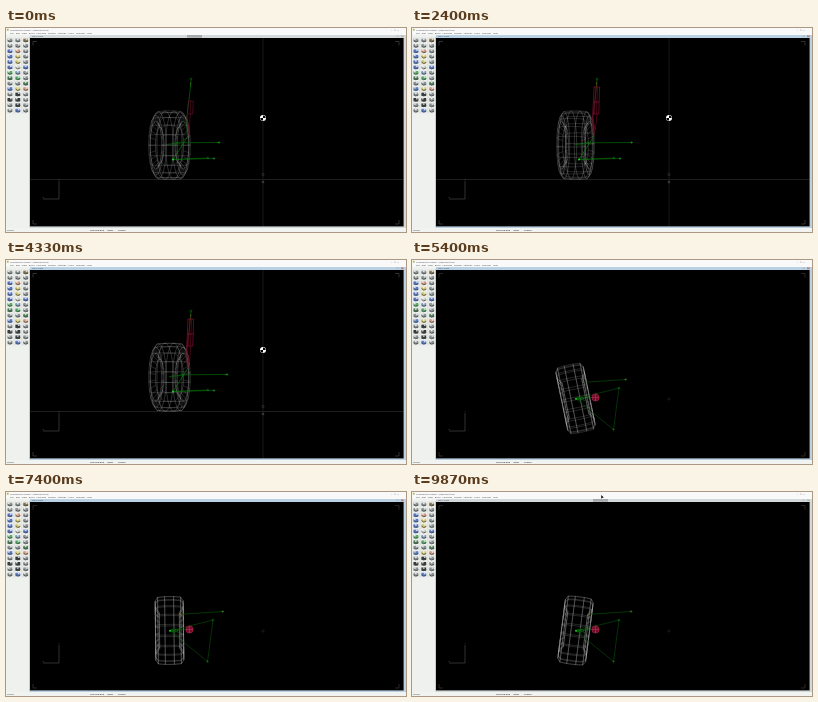
Recreate the animation shown at these times as an HTML page with a canvas. Size 400 px wide and 204 px high, loop 9.94 s.

```html
<!DOCTYPE html>
<html lang="en">
<head>
<meta charset="utf-8">
<title>Suspension steering</title>
<style>
  html, body { margin: 0; width: 100%; height: 100%; overflow: hidden; background: #000; }
  canvas { display: block; width: 400px; height: 204px; }
</style>
</head>
<body>
<canvas id="stage"></canvas>
<script>
const LOOP = 9940, PERIOD = 1740;
const PLAY_START = 70, TOP_VIEW = 4650, PLAY_END = 9500, CURSOR_IN = 7500;
const RAD = Math.PI / 180, SEGMENTS = 20;
const canvas = document.getElementById('stage');
const ctx = canvas.getContext('2d');
const dpr = window.devicePixelRatio || 1;
canvas.width = 400 * dpr;
canvas.height = 204 * dpr;

const GREEN = '#0a7a0d', DIM_GREEN = '#07520a', BRIGHT = '#14a51a', RED = '#a01038';

// Tyre cross-section: axial offset, radius
const half = [[4.5, 34.3], [11.5, 33.7], [14, 30], [14, 24], [10, 18]];
const profile = [...half.map(([a, r]) => [-a, r]).reverse(), ...half];

// One letter per toolbar icon, three per row
const iconRows = ['ggn', 'ggg', 'bog', 'byg', 'byg', 'bwb', 'ecg', 'deg', 'ggd', 'byo', 'gkg', 'kkg', 'gkg', 'gbg'];
const iconColors = {
  g: '#8f9594', n: '#8a7750', b: '#5a78c8', o: '#d99a7c', y: '#d3c46a',
  w: '#cfd0c4', e: '#58ad64', c: '#8098b8', d: '#4d7c55', k: '#343a3a'
};

function rect(x, y, w, h, color) {
  ctx.fillStyle = color;
  ctx.fillRect(x, y, w, h);
}

function line(points, color, width = 0.6, close = false) {
  ctx.beginPath();
  points.forEach(([x, y], i) => i ? ctx.lineTo(x, y) : ctx.moveTo(x, y));
  if (close) ctx.closePath();
  ctx.strokeStyle = color;
  ctx.lineWidth = width;
  ctx.stroke();
}

function dot(x, y, r, color) {
  ctx.beginPath();
  ctx.arc(x, y, r, 0, 2 * Math.PI);
  ctx.fillStyle = color;
  ctx.fill();
}

function ring(x, y, r, color, width = 0.5) {
  ctx.beginPath();
  ctx.arc(x, y, r, 0, 2 * Math.PI);
  ctx.strokeStyle = color;
  ctx.lineWidth = width;
  ctx.stroke();
}

function label(text, x, y, size = 2.5, color = '#444') {
  ctx.font = `${size}px "Open Sans", sans-serif`;
  ctx.fillStyle = color;
  ctx.fillText(text, x, y);
}

function joint(x, y, color = GREEN) {
  line([[x - 1.3, y], [x + 1.3, y]], color);
  line([[x, y - 1.3], [x, y + 1.3]], color);
}

function wheel(angle, spin, top) {
  const c = Math.cos(angle), s = Math.sin(angle);
  const project = ([a, r], phi) => {
    const y = r * Math.cos(phi), z = r * Math.sin(phi);
    const x = 163.5 + a * c - y * s;
    return top ? [x, 138.5 + a * s + y * c] : [x, 117.2 - z];
  };
  const step = 2 * Math.PI / SEGMENTS;
  const slots = [...Array(SEGMENTS).keys()];
  for (const p of profile) {
    line(slots.map(i => project(p, i * step + spin)), 'rgba(200,200,200,.45)', 0.5, true);
  }
  for (const i of slots) {
    line(profile.map(p => project(p, i * step + spin)), 'rgba(200,200,200,.36)', 0.5);
  }
}

function frontView(playing, steer, angle, spin) {
  line([[24, 151.5], [397, 151.5]], '#2b2b2b', 0.7);
  line([[257, 10], [257, 199]], '#242424', 0.7);
  wheel(angle, spin, false);

  // Strut
  line([[185, 52], [184.3, 59]], GREEN);
  line([[185, 55], [181, 88], [181, 106]], playing ? '#573418' : GREEN, 0.6);
  if (playing) {
    line([[182, 59], [187.6, 59], [186.8, 86], [180.8, 86]], RED, 0.6, true);
    for (const k of [1.7, 3.6]) line([[182 + k, 59], [180.8 + k, 86]], '#780d2d', 0.6);
    line([[181.5, 74], [187.1, 74]], RED, 0.7);
    line([[180.5, 86], [180, 101], [183.4, 101], [185, 86]], '#700c2b', 0.6);
  } else {
    line([[182.3, 73], [187.3, 73], [186.7, 86], [181.5, 86]], '#650d29', 0.7, true);
    line([[184.8, 73], [183.5, 100]], '#650d29');
  }
  line([[180.5, 88], [183, 101], [181.5, 109]], '#860f30', 0.6);
  joint(185, 51);
  dot(184.5, 55, 0.6, '#806a20');

  // Links
  const rack = 217 + 4 * steer;
  line([[162 + steer, 116.5], [175 + 3 * steer, 114.8], [rack, 114.5]], GREEN, 0.6);
  joint(rack, 114.5, BRIGHT);
  joint(174 + 3 * steer, 115);
  line([[167, 131.5], [202, 130]], GREEN, 0.6);
  line([[167, 131.5], [208, 130.5]], GREEN, 0.5);
  joint(202, 130);
  joint(208, 130.5, BRIGHT);
  line([[167, 131.5], [182, 108]], GREEN, 0.7);
  line([[164, 117], [171, 117], [177, 113]], DIM_GREEN);
  dot(167, 131.5, 1.1, '#1bc921');

  // Centre of mass and ground markers
  dot(257, 90, 3, '#fff');
  ctx.fillStyle = '#000';
  for (const q of [0, Math.PI]) {
    ctx.beginPath();
    ctx.moveTo(257, 90);
    ctx.arc(257, 90, 2.6, q - Math.PI / 2, q);
    ctx.fill();
  }
  ring(257, 146.5, 1.2, '#444');
  joint(257, 154, '#666');
}

function topView(steer, angle, spin) {
  wheel(angle, spin, true);
  const rack = 217 + 4 * steer, arm = 175 + 4 * steer;
  line([[arm, 122.3], [rack, 119.5]], DIM_GREEN, 0.65);
  line([[164, 139], [207, 128], [201.5, 169.5]], DIM_GREEN, 0.6, true);
  line([[163, 138.5], [181, 137.5]], GREEN, 0.5);
  for (let i = 0; i < 4; i++) {
    ring(166 + i * 2.1, 138.4 + (i % 2) * 0.8, 1.3, '#0a7d14', 0.5);
  }
  line([[169, 135], [169, 143]], DIM_GREEN, 0.5);
  dot(164, 138.8, 1, '#1bc921');
  joint(207, 128);
  joint(201.5, 169.5);
  joint(rack, 119.5, '#3f861e');
  dot(arm, 122.3, 0.7, '#94661f');

  dot(183.5, 137.5, 3.6, '#5d0c25');
  ring(183.5, 137.5, 3.6, '#b0244a', 0.7);
  ring(183.5, 137.5, 2.1, RED, 0.6);
  line([[180, 137.5], [187, 137.5]], '#c23d5e', 0.5);
  line([[183.5, 134], [183.5, 141]], '#c23d5e', 0.5);
  ring(257, 139, 1.1, '#263826');
}

function viewportFrame(top) {
  const color = top ? '#5c4540' : '#5c5c5c';
  for (const [x, y, dx, dy] of [[27, 13.5, 4, 4], [393, 13.5, -4, 4], [27, 196, 4, -4], [393, 196, -4, -4]]) {
    line([[x + dx, y], [x, y], [x, y + dy]], color, 0.5);
  }
  line([[37, 171], [53, 171], [53, 153]], '#606060', 0.5);
  label('x', 36.5, 170, 2.5, '#888');
  label(top ? 'Y' : 'z', 52.5, 152, 2.5, '#888');
}

function appWindow(playing) {
  const frame = playing ? '#b9d1e2' : '#d3d8da';
  rect(0, 0, 400, 7, '#f8f9f8');
  rect(0, 6.6, 24, 198, '#eff1ee');
  rect(24, 7, 376, 3, frame);
  rect(397.6, 7, 2.4, 193, frame);
  rect(24, 198.4, 376, 1.6, frame);
  rect(23, 9, 1, 190.4, '#c6cdd0');
  rect(0, 200, 400, 4, '#f1f3f1');
  rect(0.8, 0.8, 1.8, 1.8, '#b9b046');
  label('Suspension Model - Steering Study', 4, 2.8, 2.4);
  label('File   Edit   View   Build   Simulate   Review   Settings   Tools   Window   Help', 4, 5.9, 2.4);
  label('Main View', 26, 9.3, 2.3, '#40566a');
  label('–   □   ×', 385, 2.8, 2.4);
  label('– □', 390, 9.3, 2, '#555');
  rect(395, 7.4, 2.6, 1.8, playing ? '#c08078' : '#b9b9b9');
  if (!playing) rect(181, 7, 15, 2.7, '#a5a9aa');
  label('Ready', 1, 203, 2.5);
  label('Working grid', 84, 203, 2.4, '#111');
  label('Rigid', 101.5, 203, 2.4, '#111');
  label('Simple', 112, 203, 2.4, '#111');

  rect(0.5, 9.6, 22.5, 75.8, '#dfe3e0');
  iconRows.forEach((row, j) => [...row].forEach((key, i) => {
    const x = 0.8 + i * 7.9, y = 10 + j * 5.4;
    rect(x, y, 6.4, 5, '#f2f4f1');
    rect(x + 0.7, y + 0.6, 4.8, 3.5, iconColors[key]);
    rect(x + 1.2 + (j + i) % 3, y + 0.6, 1.7, 1.4, 'rgba(255,255,255,.75)');
    line([[x + 0.9, y + 2.4], [x + 3, y + 4], [x + 5.6, y + 2.8]], '#3f4a4a', 0.8);
  }));
}

function cursor(t) {
  const k = Math.min(1, Math.max(0, (t - 8600) / 1000));
  ctx.save();
  ctx.translate(185 + 4.2 * k, 0.3 + 2.7 * k);
  ctx.beginPath();
  ctx.moveTo(0, 0);
  ctx.lineTo(0, 3.7);
  ctx.lineTo(0.9, 2.9);
  ctx.lineTo(2.6, 2.6);
  ctx.closePath();
  ctx.fillStyle = '#111';
  ctx.fill();
  ctx.restore();
}

function draw(now) {
  const t = now % LOOP;
  const top = t >= TOP_VIEW;
  const playing = t >= PLAY_START && t < PLAY_END;
  const steer = -Math.cos(2 * Math.PI * t / PERIOD - 4 * RAD);
  const angle = steer * 14 * RAD;
  const spin = t * 0.00625 * RAD;

  ctx.setTransform(dpr, 0, 0, dpr, 0, 0);
  rect(0, 0, 400, 204, '#000');
  if (top) topView(steer, angle, spin);
  else frontView(playing, steer, angle, spin);
  viewportFrame(top);
  appWindow(playing);
  if (t >= CURSOR_IN) cursor(t);
}

const start = performance.now();
function tick() {
  draw(performance.now() - start);
  requestAnimationFrame(tick);
}
tick();
</script>
</body>
</html>
```
